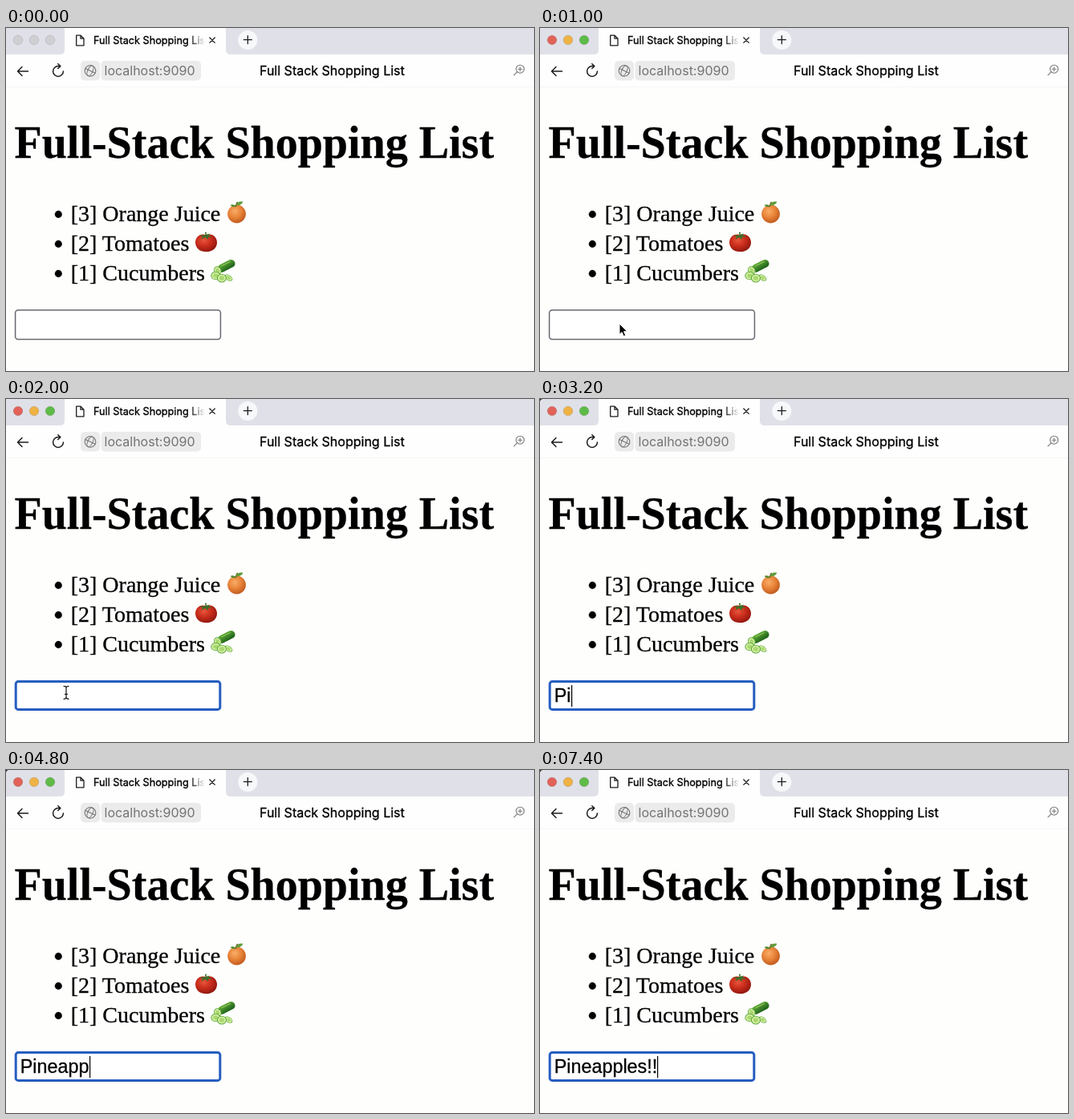
Write an HTML page that moves like this. It is 658 by 428 pixels and loops after 8000 ms.

```html
<!DOCTYPE html>
<html lang="en">
<head>
<meta charset="utf-8">
<title>Full Stack Shopping List</title>
<style>
  html, body { margin: 0; width: 100%; height: 100%; overflow: hidden; background: #fefefd; }
  svg { display: block; width: 100%; height: 100%; }
  .ui { font-family: Inter, Roboto, sans-serif; }
  .page { font-family: "Liberation Serif", "Times New Roman", serif; font-size: 28px; }
  .field { font-family: "Liberation Sans", Arial, sans-serif; font-size: 23.33px; }
  .dark { stroke: #000; stroke-width: .3; }
  .line { fill: none; stroke: #1c1c1e; stroke-width: 1.5; stroke-linecap: round; stroke-linejoin: round; }
  .grey { stroke: #77777a; stroke-width: 1.1; }
</style>
</head>
<body>
<svg viewBox="0 0 658 428" xmlns="http://www.w3.org/2000/svg">
  <defs>
    <linearGradient id="fade">
      <stop offset="0" stop-color="#fff" stop-opacity="0"/>
      <stop offset="1" stop-color="#fff"/>
    </linearGradient>
    <radialGradient id="peel" cx=".4" cy=".35" r=".7">
      <stop offset="0" stop-color="#f9ad68"/>
      <stop offset=".5" stop-color="#e88439"/>
      <stop offset="1" stop-color="#bd561c"/>
    </radialGradient>
    <radialGradient id="red" cx=".4" cy=".35" r=".7">
      <stop offset="0" stop-color="#e9553c"/>
      <stop offset=".5" stop-color="#c72b1a"/>
      <stop offset="1" stop-color="#8a150d"/>
    </radialGradient>
    <linearGradient id="skin" x2=".3" y2="1">
      <stop offset="0" stop-color="#69b43a"/>
      <stop offset="1" stop-color="#22661c"/>
    </linearGradient>
    <clipPath id="tabClip"><rect x="105" y="0" width="142" height="33"/></clipPath>
    <g id="slice">
      <circle r="6" fill="#4fa032"/>
      <circle r="5.1" fill="#d3eda0"/>
      <circle r="3.1" fill="#a9d870"/>
    </g>
  </defs>

  <!-- window chrome -->
  <rect width="658" height="428" fill="#fefefd"/>
  <rect width="658" height="33" fill="#e0e1e8"/>
  <rect y="33" width="658" height="40" fill="#fefefe"/>
  <path d="M0 73.5H658" stroke="#f5f5f5"/>
  <path d="M67 33Q73 33 73 27V0H274V27Q274 33 280 33Z" fill="#fefefe"/>
  <path id="corner" d="M0 0H3Q.5 .5 0 3Z" fill="#222"/>
  <g id="lights"></g>

  <path class="line" style="stroke-width:1.3" d="M87.7 9.2H93L97 13.2V21.8H87.7ZM93 9.2V13.2H97"/>
  <g class="ui">
    <text class="dark" x="109" y="20" font-size="12.7" clip-path="url(#tabClip)">Full Stack Shopping List</text>
    <rect x="229" y="5" width="19" height="22" fill="url(#fade)"/>
    <path class="line" style="stroke-width:1.3" d="M253.8 12l6.4 6.4M260.2 12l-6.4 6.4"/>
    <circle cx="301.3" cy="15" r="12" fill="#f7f8fa"/>
    <path class="line" style="stroke-width:1.3" d="M296.3 14.7h10M301.3 9.7v10"/>

    <path class="line" d="M27.5 54H14.8M20 48.5L14.5 54L20 59.5"/>
    <path class="line" d="M71.4 54A6.4 6.4 0 1 1 65 47.6H67.3M64.8 44.8L67.8 47.6L64.8 50.5"/>
    <rect x="93" y="41" width="24" height="24.5" rx="5" fill="#ebebeb"/>
    <rect x="118.5" y="41" width="124.5" height="24.5" rx="5" fill="#ebebeb"/>
    <g class="line grey">
      <g transform="translate(105 53.3) rotate(25)">
        <circle r="6.8"/>
        <ellipse rx="3.1" ry="6.8"/>
        <path d="M-6.8 0H6.8"/>
      </g>
      <circle cx="640.7" cy="51.2" r="5"/>
      <path d="M637 54.9l-4 4M638.2 51.2h5M640.7 48.7v5"/>
    </g>
    <text x="122.5" y="59" font-size="16" fill="#737373">localhost:9090</text>
    <text class="dark" x="316" y="59" font-size="16">Full Stack Shopping List</text>
  </g>

  <!-- page -->
  <text class="page dark" x="10.5" y="161.6" style="font-size:56px;font-weight:bold">Full-Stack Shopping List</text>
  <g class="page dark" id="list"></g>

  <g transform="translate(287.5 231)">
    <circle cx="0" cy="1" r="11.4" fill="url(#peel)"/>
    <path d="M-1 -8Q-1 -11.5 1 -14" fill="none" stroke="#6a5a1e" stroke-width="1.4"/>
    <path d="M-1 -8Q-3 -12 -8 -10Q-5.5 -7 -1 -8Z" fill="#4d8a30"/>
    <path d="M-1.5 -9.5Q1 -15.5 8 -14.2Q5.5 -8.8 -1.5 -9.5Z" fill="#5f9c3b"/>
  </g>
  <g transform="translate(249.5 267.5)">
    <path d="M0 -9.5C8 -12 13.6 -6.5 13.5 .3C13.2 8 7 11.8 0 11.8S-13.2 8 -13.5 .3C-13.6 -6.5 -8 -12 0 -9.5Z" fill="url(#red)"/>
    <path d="M-1 -9L-8.5 -9L-4.5 -7L-6 -3.5L-1.5 -6.5L2 -3.5L2.5 -7L7.5 -6.5L3 -9.2L4.5 -11L0 -9.8L.4 -13L-1.6 -12.6Z" fill="#3b6f2a"/>
  </g>
  <g transform="translate(269.5 304.5)">
    <rect x="-9" y="-5" width="23" height="10" rx="5" fill="url(#skin)" transform="translate(3 -6.5) rotate(-27)"/>
    <path d="M-1 -7.5L10 -13" stroke="#9cce65" fill="none"/>
    <use href="#slice" transform="translate(-5.8 -2) rotate(-27) scale(.75 .9)"/>
    <use href="#slice" transform="translate(8 7.2) rotate(35) scale(.9 .55)"/>
    <use href="#slice" transform="translate(-8.2 4.6) scale(1 .85)"/>
    <use href="#slice" transform="translate(-.6 7.6) scale(1 .9)"/>
  </g>

  <rect id="box" fill="#fff"/>
  <text id="typed" class="field dark" x="17.8" y="378"></text>
  <rect id="caret" y="357" width="1.2" height="27"/>

  <path id="arrow" d="M0 0V13.4L3.1 10.6L5.3 15.6L7.7 14.6L5.5 9.7H9.7Z" fill="#000" stroke="#fff" stroke-width="1" stroke-linejoin="round"/>
  <g id="beam" fill="none" stroke-linecap="round">
    <path d="M-3 -8Q0 -8 0 -6Q0 -8 3 -8M0 -6V6M-3 8Q0 8 0 6Q0 8 3 8M-1.5 2H1.5" stroke="#fff" stroke-width="3"/>
    <path d="M-3 -8Q0 -8 0 -6Q0 -8 3 -8M0 -6V6M-3 8Q0 8 0 6Q0 8 3 8M-1.5 2H1.5" stroke="#111" stroke-width="1.2"/>
  </g>
</svg>
<script>
const LOOP = 8000, STEP = 200;
const WORD = "Pineapples!!";
// when each letter of WORD appears
const KEYS = [3000, 3200, 3600, 4000, 4200, 4400, 4800, 5000, 5000, 5200, 7000, 7400];
// spans in which the caret is lit
const CARET = [[2400, 5600], [6200, 8000]];
const LIGHTS = ["#e2625a", "#efb244", "#5fbb48"];
const ITEMS = ["[3] Orange Juice", "[2] Tomatoes", "[1] Cucumbers"];

const $ = id => document.getElementById(id);

function add(parent, tag, attrs, text = "") {
  const el = document.createElementNS("http://www.w3.org/2000/svg", tag);
  set(el, attrs);
  el.textContent = text;
  return parent.appendChild(el);
}

function set(el, attrs) {
  for (const key in attrs) el.setAttribute(key, attrs[key]);
}

const show = (id, on) => set($(id), { visibility: on ? "visible" : "hidden" });
const place = (id, [x, y]) => set($(id), { transform: `translate(${x} ${y})` });

function glide(t, start, end, from, to) {
  const p = Math.min(1, Math.max(0, (t - start) / (end - start)));
  const e = 1 - (1 - p) ** 2;
  return from.map((v, i) => v + (to[i] - v) * e);
}

const lamps = LIGHTS.map((_, i) =>
  add($("lights"), "circle", { cx: 15 + 20 * i, cy: 15, r: 5.8 }));

ITEMS.forEach((item, i) => {
  const y = 240.5 + 37 * i;
  add($("list"), "circle", { cx: 65.3, cy: y - 8, r: 4.4 });
  add($("list"), "text", { x: 80.7, y }, item);
});

function draw(t) {
  const active = t >= 800, focused = t >= 1600;
  lamps.forEach((lamp, i) => set(lamp, {
    fill: active ? LIGHTS[i] : "#d0cfd2",
    stroke: active ? "rgba(0,0,0,.15)" : "#bdbcc0",
    "stroke-width": 0.8
  }));
  show("corner", t >= 2600);

  set($("box"), focused
    ? { x: 12.2, y: 352.6, width: 254.6, height: 34.8, rx: 3, stroke: "#265dbf", "stroke-width": 3 }
    : { x: 11.6, y: 352, width: 255.8, height: 36.4, rx: 3.5, stroke: "#686770", "stroke-width": 1.5 });

  const typed = $("typed");
  typed.textContent = WORD.slice(0, KEYS.filter(k => k <= t).length);
  const end = typed.textContent ? typed.getComputedTextLength() : 0;
  set($("caret"), { x: Math.round(18 + end) });
  show("caret", CARET.some(([on, off]) => t >= on && t < off));

  show("arrow", t >= 200 && t < 1200);
  place("arrow", glide(t, 0, 1000, [150, 440], [99, 369]));
  show("beam", t >= 1200 && t < 3000);
  place("beam", glide(t, 1000, 2000, [99, 371], [75, 366.3]));
}

function tick(now) {
  draw(Math.floor(now % LOOP / STEP) * STEP);
  requestAnimationFrame(tick);
}

draw(0);
requestAnimationFrame(tick);
</script>
</body>
</html>
```
